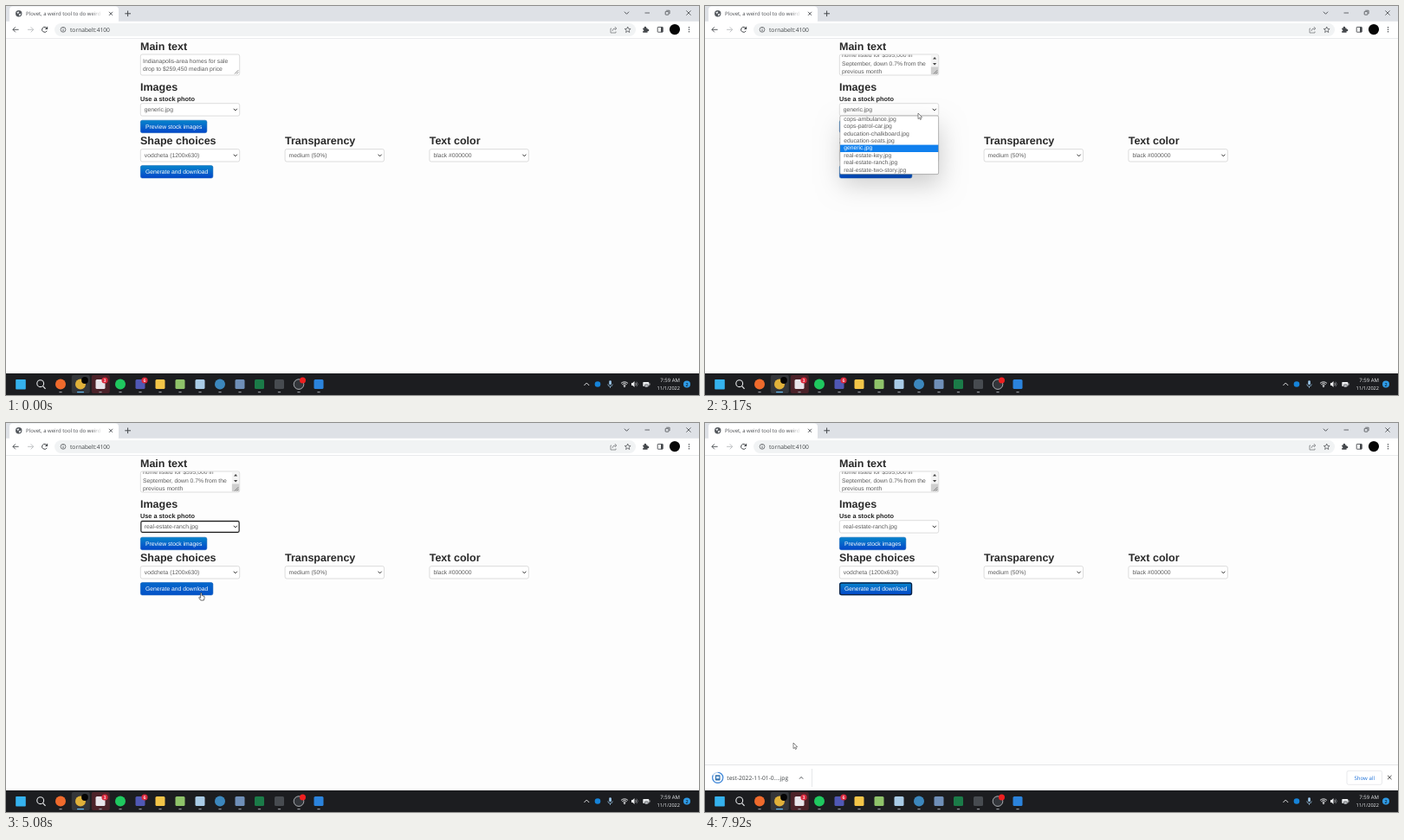
These frames come from a looping animation (800 px wide and 450 px high, 8 s). An HTML page with a canvas:

```html
<!DOCTYPE html>
<html lang="en">
<head>
<meta charset="utf-8">
<title>Screen recording</title>
<style>
html, body { margin: 0; width: 100%; height: 100%; overflow: hidden; background: #fdfdfd; }
canvas { display: block; width: 100vw; height: 100vh; }
</style>
</head>
<body>
<canvas id="stage" width="800" height="450"></canvas>
<script>
const ctx = document.getElementById('stage').getContext('2d');
const LOOP = 8000, STEP = 250 / 3;
const ARIAL = '"Liberation Sans", Arial, sans-serif';
const UI = '"Open Sans", "Noto Sans", sans-serif';
const BODY = 6.77;

// Moments at which the interface switches state
const AT = { press: 1170, paste: 1740, open: 2740, pick: 4720, submit: 6190, loaded: 7080, shelf: 7230 };

const PATH = [
  [80, 508, 447], [480, 390, 330], [900, 266, 192], [1120, 257, 73], [1180, 257, 73],
  [1520, 110, 60], [1620, 110, 60], [1880, 239, 74], [2120, 239, 74], [2540, 246, 121],
  [2740, 246, 124], [3230, 246, 124], [3400, 243, 149], [3830, 232, 190], [4180, 227, 181],
  [4760, 227, 181], [5030, 225.3, 196.5], [5840, 225.3, 196.5], [6000, 225.3, 194.5],
  [7240, 225.3, 194.5], [7860, 102, 370]
];
const FILES = ['cops-ambulance', 'cops-patrol-car', 'education-chalkboard', 'education-seats',
  'generic', 'real-estate-key', 'real-estate-ranch', 'real-estate-two-story'];
const LIST_Y = 127, ROW = 8.4;

function pointer(t) {
  if (t < PATH[0][0]) return null;
  for (let i = 1; i < PATH.length; i++) {
    const [t0, x0, y0] = PATH[i - 1], [t1, x1, y1] = PATH[i];
    if (t < t1) {
      const p = (t - t0) / (t1 - t0), e = p * p * (3 - 2 * p);
      return { x: x0 + (x1 - x0) * e, y: y0 + (y1 - y0) * e };
    }
  }
  const last = PATH[PATH.length - 1];
  return { x: last[1], y: last[2] };
}

const inside = (m, x, y, w, h) => m && m.x >= x && m.x <= x + w && m.y >= y && m.y <= y + h;

function rect(x, y, w, h, color) {
  ctx.fillStyle = color;
  ctx.fillRect(x, y, w, h);
}
function box(x, y, w, h, r, fill, stroke, lw = 0.6) {
  ctx.beginPath();
  ctx.roundRect(x, y, w, h, r);
  if (fill) { ctx.fillStyle = fill; ctx.fill(); }
  if (stroke) { ctx.strokeStyle = stroke; ctx.lineWidth = lw; ctx.stroke(); }
}
function disc(x, y, r, color) {
  ctx.beginPath();
  ctx.arc(x, y, r, 0, 7);
  ctx.fillStyle = color;
  ctx.fill();
}
function arc(x, y, r, a, b, color, lw = 1) {
  ctx.beginPath();
  ctx.arc(x, y, r, a, b);
  ctx.strokeStyle = color;
  ctx.lineWidth = lw;
  ctx.stroke();
}
function trace(points) {
  ctx.beginPath();
  for (let i = 0; i < points.length; i += 2) ctx.lineTo(points[i], points[i + 1]);
}
function line(color, lw, ...points) {
  trace(points);
  ctx.strokeStyle = color;
  ctx.lineWidth = lw;
  ctx.stroke();
}
function poly(color, ...points) {
  trace(points);
  ctx.fillStyle = color;
  ctx.fill();
}
function text(s, x, y, size, color, font = ARIAL, weight = 400, align = 'left') {
  ctx.font = `${weight} ${size}px ${font}`;
  ctx.textAlign = align;
  ctx.fillStyle = color;
  ctx.fillText(s, x, y);
}
function cross(x, y, r, color, lw = 0.9) {
  line(color, lw, x - r, y - r, x + r, y + r);
  line(color, lw, x - r, y + r, x + r, y - r);
}
const chevron = (x, y, w, h, color, lw = 0.9) => line(color, lw, x - w, y - h, x, y + h, x + w, y - h);

function arrow(x, y, dir, color) {
  line(color, 0.9, x - 3.3, y, x + 3.3, y);
  line(color, 0.9, x + dir * 0.4, y - 3, x + dir * 3.4, y, x + dir * 0.4, y + 3);
}

function drawBrowser(t) {
  const ink = '#45484c', loading = t >= AT.submit && t < AT.loaded;
  rect(0, 0, 800, 18, '#dee1e6');
  box(4, 0.5, 126, 20, 4, '#fff');
  rect(0, 17.8, 800, 19.2, '#fff');
  rect(0, 37, 800, 0.6, '#e3e5e8');

  if (loading) {
    const a = -t / 240;
    arc(14.5, 8.8, 3.4, a, a + 1.3, '#c9ccd1', 0.8);
  } else {
    disc(14.7, 8.8, 3.7, '#54585d');
    poly('#e8eaec', 12.2, 7.4, 14.6, 6.3, 15.2, 7.8, 13.7, 9.1);
    poly('#e8eaec', 14.8, 9.6, 17.3, 8.4, 17, 10.4, 15.2, 11.4);
  }
  const fade = ctx.createLinearGradient(98, 0, 111, 0);
  fade.addColorStop(0, '#494c50');
  fade.addColorStop(1, 'rgba(73,76,80,0)');
  text('Plovet, a weird tool to do weird', 23, 11, 6, fade, UI);
  cross(121, 8.8, 2, ink);
  line(ink, 1, 137.3, 8.8, 144, 8.8);
  line(ink, 1, 140.6, 5.5, 140.6, 12.1);

  chevron(716.5, 8, 2.6, 1.3, ink);
  line(ink, 0.8, 737.5, 8, 743, 8);
  box(761.2, 6.3, 3.8, 3.8, 0.5, null, ink, 0.8);
  line(ink, 0.7, 762.3, 5.2, 766.1, 5.2, 766.1, 9);
  cross(788, 8, 2.6, ink, 0.8);

  arrow(11.3, 27.3, -1, ink);
  arrow(28.3, 27.3, 1, '#b9bbbe');
  if (loading) cross(44.8, 27.3, 2.7, ink, 1);
  else {
    arc(44.6, 27.3, 3, 0.5, 5.5, ink, 1);
    poly(ink, 48.1, 23.6, 48.1, 27, 44.9, 27);
  }
  box(56, 20, 671, 15, 7.5, '#f1f3f4');
  arc(66, 27.3, 2.9, 0, 7, ink, 0.7);
  rect(65.6, 26.9, 0.8, 2.2, ink);
  rect(65.6, 25.4, 0.8, 0.8, ink);
  text('tornabelt:4100', 74, 29.8, 6.7, '#3c4043', UI);

  line('#6b6e72', 0.7, 699, 26, 698, 26, 698, 31, 704, 31, 704, 29.5);
  line('#6b6e72', 0.7, 700, 29, 701, 26.5, 704.4, 26);
  line('#6b6e72', 0.7, 702.8, 24, 704.8, 26, 702.8, 28);
  const star = [];
  for (let i = 0; i <= 10; i++) {
    const r = i % 2 ? 1.6 : 3.6, a = i * Math.PI / 5;
    star.push(717.7 + r * Math.sin(a), 27.6 - r * Math.cos(a));
  }
  line(ink, 0.7, ...star);
  box(735.2, 25.4, 5.4, 5.4, 0.6, ink);
  disc(737.9, 25, 1.3, ink);
  disc(741, 28, 1.3, ink);
  disc(735.4, 28.2, 0.9, '#fff');
  box(752.2, 24.4, 6, 5.8, 0.5, null, ink, 0.9);
  rect(756, 24.4, 2.3, 5.8, ink);
  disc(772, 27.1, 6.1, '#050505');
  for (let i = -1; i < 2; i++) disc(788.5, 27.3 + i * 2.5, 0.75, ink);
}

function heading(s, x, y) { text(s, x, y, 12.5, '#2a2a2a', ARIAL, 700); }

function select(value, x, y, focused) {
  box(x + 0.3, y, 114.4, 14.4, 2, '#fff', '#c6c6c6');
  text(value, x + 4.8, y + 9.6, BODY, '#5c5c5c');
  chevron(x + 109.8, y + 7.2, 2, 1.1, '#333', 1);
  if (focused) box(x + 0.9, y + 0.9, 113.2, 12.8, 1.6, null, '#1c1c1c', 1.1);
}

function button(label, y, w, hover, focused) {
  const g = ctx.createLinearGradient(0, y, 0, y + 14.5);
  g.addColorStop(0, hover ? '#0668ca' : '#0785cb');
  g.addColorStop(1, hover ? '#0452c8' : '#0446c9');
  box(155.3, y, w, 14.5, 2, g, hover ? '#0a56b4' : '#1462b4', 0.5);
  if (focused) box(155.7, y + 0.5, w - 0.8, 13.5, 2, null, '#10203c', 1.2);
  text(label, 161, y + 9.6, BODY, '#fff');
}

function selection(line1, line2, m, held) {
  if (!held) return;
  const upper = m.y < 66.5;
  ctx.font = `400 ${BODY}px ${ARIAL}`;
  [[line1, 65.6, upper], [line2, 75, true]].forEach(([s, y, on], i) => {
    if (!on) return;
    const end = 158 + ctx.measureText(s).width;
    const start = i && upper ? 158 : Math.max(158, Math.min(end, m.x));
    if (end <= start) return;
    rect(start, y - 7, end - start, 9.2, '#1a78d6');
    ctx.save();
    ctx.beginPath();
    ctx.rect(start, y - 7, end - start, 9.2);
    ctx.clip();
    text(s, 158, y, BODY, '#fff');
    ctx.restore();
  });
}

function drawTextarea(t, m) {
  const focused = t >= AT.press && t < AT.open, pasted = t >= AT.paste;
  ctx.save();
  if (focused) { ctx.shadowColor = 'rgba(82,168,236,.7)'; ctx.shadowBlur = 4; }
  box(155.3, 56, 114.4, 24, 2, '#fff', focused ? '#62b0ec' : '#c6c6c6', focused ? 0.9 : 0.6);
  ctx.restore();

  ctx.save();
  ctx.beginPath();
  ctx.rect(155.8, 56.4, 113.4, 23.2);
  ctx.clip();
  if (pasted) {
    ['home listed for $595,000 in', 'September, down 0.7% from the', 'previous month']
      .forEach((s, i) => text(s, 158, 59.3 + i * 9.35, BODY, '#5c5c5c'));
    if (focused && (t - AT.paste) % 1000 < 500) rect(204, 71.6, 0.7, 7.4, '#222');
    rect(260.8, 56.4, 8.6, 14, '#f4f4f4');
    poly('#444', 263, 61.4, 267.2, 61.4, 265.1, 58.9);
    poly('#444', 263, 65.9, 267.2, 65.9, 265.1, 68.4);
    rect(260.8, 70.4, 8.6, 9, '#cfcfcf');
  } else {
    const a = 'Indianapolis-area homes for sale', b = 'drop to $259,450 median price';
    text(a, 158, 65.6, BODY, '#5c5c5c');
    text(b, 158, 75, BODY, '#5c5c5c');
    selection(a, b, m, t >= AT.press);
  }
  line('#555', 0.7, 264, 78.5, 268.3, 74.2);
  line('#555', 0.7, 266.3, 78.5, 268.3, 76.5);
  ctx.restore();
}

function drawList(t) {
  let row = 4;
  for (let s = AT.open; s <= t; s += STEP / 2) {
    const m = pointer(s), i = Math.floor((m.y - LIST_Y) / ROW);
    if (i >= 0 && i < FILES.length) row = i;
  }
  ctx.save();
  ctx.shadowColor = 'rgba(0,0,0,.19)';
  ctx.shadowBlur = 28;
  ctx.shadowOffsetX = 2;
  ctx.shadowOffsetY = 12;
  box(155.8, LIST_Y, 113.8, 67.6, 1.5, '#fff');
  ctx.restore();
  rect(156, LIST_Y + row * ROW, 113.4, ROW, '#1080ee');
  FILES.forEach((f, i) =>
    text(f + '.jpg', 160.2, LIST_Y + 5.8 + i * ROW, BODY, i === row ? '#fff' : '#5c5c5c'));
  box(155.8, LIST_Y, 113.8, 67.6, 1.5, null, '#767676', 0.52);
}

function drawPage(t, m) {
  const open = t >= AT.open && t < AT.pick;
  rect(0, 37.5, 800, 388, '#fdfdfd');
  heading('Main text', 155, 51);
  drawTextarea(t, m);
  heading('Images', 155, 98.4);
  text('Use a stock photo', 155, 110.2, 7.3, '#222', ARIAL, 700);
  select(t < AT.pick ? 'generic.jpg' : 'real-estate-ranch.jpg', 155, 112.7, t >= AT.pick && t < AT.submit);
  button('Preview stock images', 132.2, 76.6, !open && inside(m, 155, 132, 77, 14.5));
  heading('Shape choices', 155, 160.2);
  heading('Transparency', 322, 160.2);
  heading('Text color', 488.7, 160.2);
  select('vodcheta (1200x630)', 155, 165.6);
  select('medium (50%)', 321.8, 165.6);
  select('black #000000', 488.6, 165.6);
  button('Generate and download', 184.6, 83.6, !open && inside(m, 155, 184, 84, 15), t >= AT.submit);
  if (open) drawList(t);
}

function drawShelf(t) {
  const p = Math.min(1, (t - AT.shelf) / 200);
  if (p <= 0) return;
  ctx.save();
  ctx.translate(0, 30 * (1 - p));
  rect(0, 395, 800, 30, '#fff');
  rect(0, 395, 800, 0.7, '#d9dbde');
  arc(14.7, 410.3, 6.1, 0, 7, '#b9d2ee', 1.1);
  arc(14.7, 410.3, 6.1, -1.57, 3.6, '#3d86d8', 1.1);
  box(11.9, 407.2, 5.6, 6.2, 0.6, '#2f6fae');
  rect(13, 408.8, 3.4, 2.6, '#dcebf8');
  text('test-2022-11-01-0....jpg', 25.3, 412.8, 6.65, '#3c4043', UI);
  line('#45484c', 0.9, 109, 411.7, 111.1, 409.4, 113.2, 411.7);
  rect(123, 400, 0.6, 21, '#d5d7da');
  box(741, 402.3, 40.5, 16, 2, '#fff', '#d8dbe0');
  text('Show all', 761.2, 412.5, 6.1, '#1a6fd8', UI, 400, 'center');
  cross(790.3, 410, 2.2, '#333', 0.9);
  ctx.restore();
}

// x, shape, size, color, badge
const APPS = [
  [63, 'o', 12, '#ef6a2c'], [86, 'o', 12, '#e0b13a'], [109, 's', 11, '#e9e4ea', '3'],
  [132, 'o', 12, '#1fc85f'], [155, 's', 11, '#5058b4', '6'], [178, 's', 11, '#f3c548'],
  [201, 's', 11, '#8fc36a'], [224, 's', 11, '#a9cbe6'], [247, 'o', 12, '#3c87bd'],
  [270, 's', 11, '#6f8fb8'], [292.5, 's', 11, '#1b7b48'], [315.5, 's', 11, '#474b50'],
  [338, 'o', 12, '#33363b'], [361, 's', 11, '#2b83dc']
];

function drawTaskbar() {
  const bar = '#1c1d20';
  rect(0, 425, 800, 25, bar);
  box(75.8, 427, 21, 21, 2, '#34363a');
  box(98.8, 427, 21, 21, 2, '#4c2229');
  box(11.2, 432, 11.6, 11.6, 0.8, '#35b2ee');
  arc(39.7, 436.7, 3.9, 0, 7, '#e6e8ea', 1.1);
  line('#e6e8ea', 1.2, 42.5, 439.6, 45.5, 442.8);
  for (const [x, shape, size, color, badge] of APPS) {
    if (shape === 'o') disc(x, 437.6, size / 2, color);
    else box(x - size / 2, 437.6 - size / 2, size, size, 1.5, color);
    const active = x === 86;
    box(x - (active ? 4 : 1.7), 446, active ? 8 : 3.4, 1.3, 0.6, active ? '#62b8ee' : '#8e9298');
    if (badge) {
      disc(x + 5, 433, 3.6, '#d8263a');
      text(badge, x + 5, 435, 5.2, '#fff', UI, 600, 'center');
    }
  }
  disc(91, 433, 3.9, '#050505');
  arc(338, 437.6, 5.8, 0, 7, '#c9ccd0', 0.8);
  disc(342.5, 433, 3.5, '#ee2020');

  const ink = '#eceef0';
  line(ink, 0.9, 667.4, 439, 670.3, 436, 673.2, 439);
  disc(683, 437.5, 3.3, '#1683d8');
  box(696.2, 433.2, 2.7, 5, 1.3, '#9cc7ea');
  arc(697.5, 437.4, 2.7, 0, Math.PI, '#9cc7ea', 0.7);
  line('#9cc7ea', 0.8, 697.5, 440, 697.5, 441.8);
  for (const r of [2, 3.8, 5.6]) arc(714, 440.4, r, -2.36, -0.78, ink, 0.9);
  disc(714, 440.2, 0.9, ink);
  poly(ink, 722, 436, 723.4, 436, 725.5, 434, 725.5, 441, 723.4, 439, 722, 439);
  arc(725.2, 437.5, 2.2, -0.8, 0.8, ink, 0.7);
  arc(725.2, 437.5, 3.9, -0.8, 0.8, '#8c9096', 0.7);
  box(735.3, 435, 7, 5, 0.8, ink);
  rect(742.5, 436.5, 0.9, 2, ink);
  box(737.3, 437.8, 4, 3.3, 1, '#b8bbbf', bar, 0.5);
  text('7:59 AM', 778, 435.4, 6, ink, UI, 400, 'right');
  text('11/1/2022', 778, 443.6, 5.6, ink, UI, 400, 'right');
  disc(786, 437.4, 4, '#2f9be6');
  text('2', 786, 439.5, 5.4, '#10202e', UI, 600, 'center');
}

function drawPointer(t, m) {
  if (!m) return;
  const { x, y } = m, open = t >= AT.open && t < AT.pick;
  ctx.save();
  ctx.translate(x, y);
  ctx.lineJoin = 'round';
  if (inside(m, 155, 56, 106, 24)) {
    line('#333', 0.7, 0, -3.6, 0, 3.6);
    line('#333', 0.7, -1.5, -3.8, 1.5, -3.8);
    line('#333', 0.7, -1.5, 3.8, 1.5, 3.8);
  } else if (!open && (inside(m, 155, 132, 77, 14.5) || inside(m, 155, 184, 84, 15))) {
    const hand = [-0.7, 0.5, 0, -0.3, 0.7, 0.5, 0.7, 3, 3.6, 3.8, 3.8, 6, 3, 8.6, -0.6, 8.6, -2.6, 5.6, -2, 4.7, -0.7, 5.8, -0.7, 0.5];
    poly('#fff', ...hand);
    line('#333', 0.7, ...hand);
  } else {
    const tip = [0, 0, 0, 6.6, 1.5, 5.3, 2.5, 7.5, 3.6, 7, 2.6, 4.9, 4.6, 4.7, 0, 0];
    poly('#fff', ...tip);
    line('#4a4a4a', 0.65, ...tip);
  }
  ctx.restore();
}

function draw(now) {
  const t = Math.floor((now % LOOP) / STEP + 0.05) * STEP;
  const m = pointer(t);
  ctx.textRendering = 'geometricPrecision';
  ctx.lineCap = 'butt';
  drawPage(t, m);
  drawShelf(t);
  drawTaskbar();
  drawBrowser(t);
  drawPointer(t, m);
}

const start = performance.now();
function tick() {
  draw(performance.now() - start);
  requestAnimationFrame(tick);
}
tick();
</script>
</body>
</html>
```
